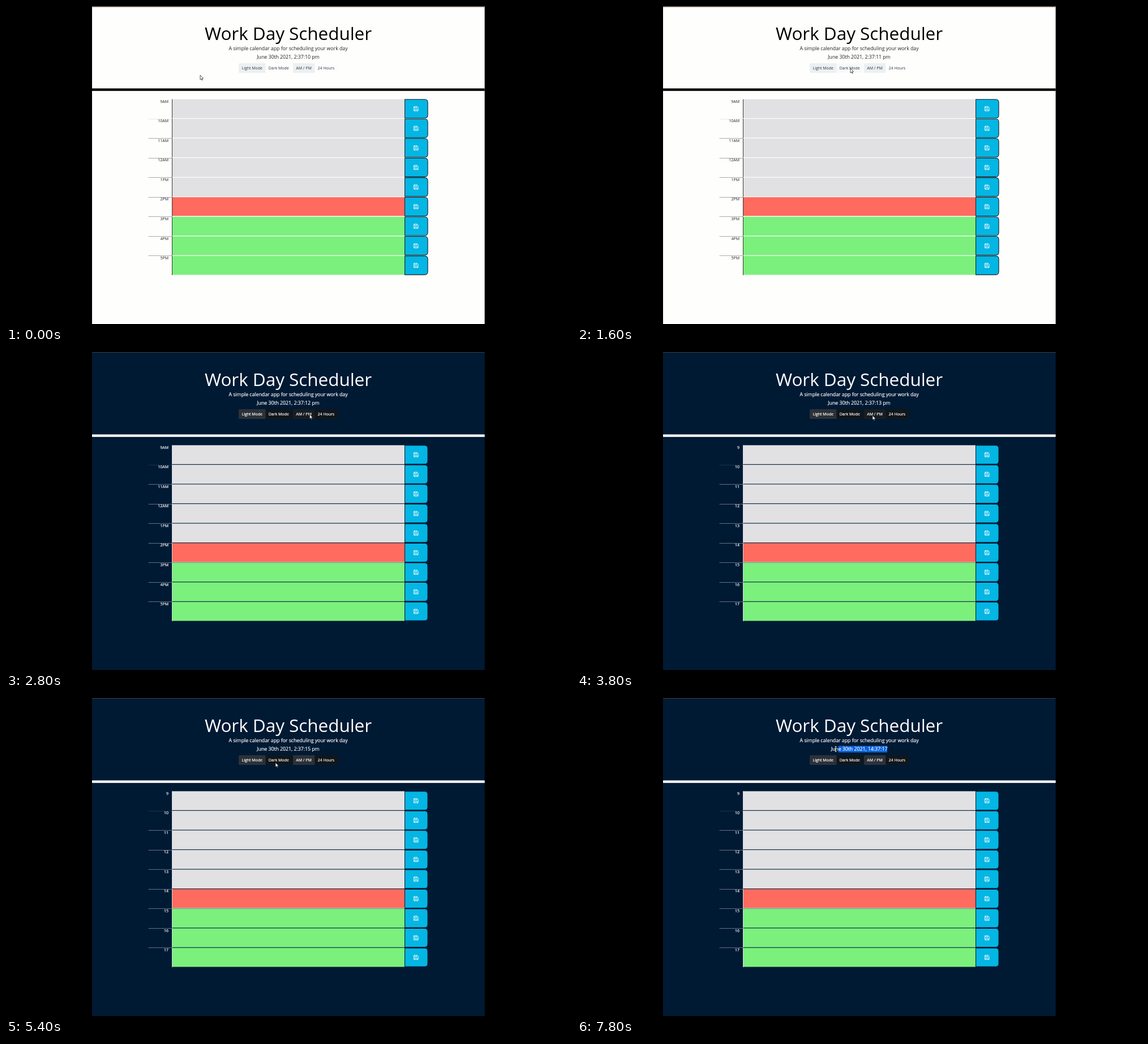
These frames come from a looping animation (998 px wide and 561 px high, 8 s). An HTML page:

```html
<!DOCTYPE html>
<html lang="en">
<head>
<meta charset="utf-8">
<title>Work Day Scheduler</title>
<style>
  html, body { margin: 0; width: 100%; height: 100%; overflow: hidden; background: #000; }
  svg {
    display: block; width: 998px; height: 561px;
    --page: #fefefd; --ink: #000; --text: #222; --gap: #fefefd; --top: #46392a;
    --edge: #14222c; --side: #222; --heavy: 0;
  }
  svg.dark {
    --page: #011a34; --ink: #fff; --text: #fff; --gap: #17304a; --top: #3b3a36;
    --edge: #011a34; --side: #dfe6ee; --heavy: .18px;
  }
  text { font-family: "Open Sans", sans-serif; fill: var(--text); text-anchor: middle; }
  .small { font-size: 6.98px; stroke: var(--text); stroke-width: var(--heavy); }
  .lead { font-size: 8.72px; stroke: var(--text); stroke-width: var(--heavy); }
  .hour { text-anchor: end; }
</style>
</head>
<body>
<svg id="stage" viewBox="0 0 998 561">
  <rect width="998" height="561"/>
  <rect x="152" width="693.5" height="561" fill="var(--page)"/>
  <rect id="strip" x="152" width="693.5" height="1.7" fill="var(--top)"/>
  <rect x="152" y="145.4" width="693.5" height="4.4" fill="var(--ink)"/>
  <text x="498.5" y="60.3" font-size="31.4" style="fill:var(--ink)">Work Day Scheduler</text>
  <text class="lead" x="498.5" y="77.6">A simple calendar app for scheduling your work day</text>
  <rect id="selection" y="84.5" height="11.5" fill="#0b63d8"/>
  <text id="date" class="lead" x="498.5" y="93.2"></text>
  <g id="buttons"></g>
  <g id="rows"></g>
  <path id="arrow" d="M0 0V8L1.9 6.3L3.1 9L4.3 8.4L3.1 5.9H5.6Z" fill="#fff" stroke="#111" stroke-width=".7"/>
  <path id="beam" d="M-1.5 -4.5H1.5M0 -4.5V4.5M-1.5 4.5H1.5" fill="none" stroke="#e8eef6" stroke-width=".9"/>
</svg>
<script>
const LOOP = 8000, STEP = 200, PITCH = 34.55;
const $ = id => document.getElementById(id);

function add(parent, tag, attrs, text = '') {
  const node = document.createElementNS('http://www.w3.org/2000/svg', tag);
  for (const key in attrs) node.setAttribute(key, attrs[key]);
  node.textContent = text;
  parent.append(node);
  return node;
}

// Tables of [time, value...]
const CURSOR = [
  [0, 343, 122], [400, 343, 122], [1200, 479, 112], [1600, 483, 110], [2400, 483, 110],
  [3000, 563, 110], [3400, 563, 111], [3800, 522, 112], [4200, 522, 112], [4800, 563, 111],
  [5000, 563, 111], [5400, 476, 114], [6000, 477, 113], [6200, 479, 109], [6600, 479, 109],
  [7200, 548, 90], [7400, 546, 90], [7600, 518, 90], [7800, 457, 90], [8000, 457, 90]
];
const CLOCK_24 = [[0, false], [3200, true], [4000, false], [5000, true]];
const DATE_24 = [[0, false], [6000, true]];
const DARK_AT = 1800, BEAM_AT = 7000, DRAG_AT = 7600;

const held = (table, t) => table.filter(row => row[0] <= t).pop()[1];

function along(table, t) {
  const i = Math.max(1, table.findIndex(row => row[0] > t));
  const [t0, x0, y0] = table[i - 1], [t1, x1, y1] = table[i];
  const k = (t - t0) / (t1 - t0);
  return [x0 + (x1 - x0) * k, y0 + (y1 - y0) * k];
}

const buttons = [
  ['Light Mode', 411, 458.7, 434.8], ['Dark Mode', 458.7, 505.2, 481.7],
  ['AM / PM', 507, 545.5, 526], ['24 Hours', 545.5, 586, 565.4]
].map(([name, left, right, middle]) => ({
  left, right,
  box: add($('buttons'), 'rect', { x: left, y: 101, width: right - left, height: 17, rx: 1.5 }),
  label: add($('buttons'), 'text', { class: 'small', x: middle, y: 112 }, name)
}));

const hours = Array.from({ length: 9 }, (_, i) => {
  const y = 164.5 + PITCH * i, rows = $('rows');
  const fill = i < 5 ? '#e1e1e3' : i === 5 ? '#ff6b5e' : '#7bf07d';
  if (i) add(rows, 'path', {
    d: `M252 ${Math.round(y - .5) + .5}H293`, stroke: 'var(--text)', 'stroke-width': .8,
    'stroke-dasharray': '1.3 .9', opacity: i === 1 ? .2 : .8
  });
  const label = add(rows, 'text', { class: 'small hour', x: 287, y: y + 6.2 });
  add(rows, 'rect', { x: 293, y: y - .5, width: 411, height: PITCH, fill: 'var(--gap)' });
  add(rows, 'rect', { x: 293.5, y, width: 410.5, height: PITCH - 1.2, fill });
  add(rows, 'rect', { x: 293, y, width: .9, height: PITCH - .6, fill: 'var(--side)' });
  add(rows, 'path', {
    d: `M704.5 ${y + .2}h35q5.5 0 5.5 5.5v22q0 5.5 -5.5 5.5h-35z`,
    fill: '#03b6e3', stroke: 'var(--edge)', 'stroke-width': 1.1
  });
  add(rows, 'path', {
    d: `M720.5 ${y + 13}h5.8l1.7 1.7v5.8h-7.5zM722 ${y + 13}v2.4h3.6v-2.4M722.2 ${y + 20.5}v-2.7h4v2.7`,
    fill: 'none', stroke: '#fff', 'stroke-width': .9
  });
  return label;
});
add($('rows'), 'rect', { x: 293.5, y: 370.4, width: 410.5, height: 1, fill: '#eef4ee' });

function hourName(i, full) {
  const hour = 9 + i;
  if (full) return hour;
  return hour > 12 ? hour - 12 + 'PM' : hour + 'AM';
}

function buttonFill(i, t, hover) {
  const first = i % 2 === 0;
  if (t < DARK_AT) return first ? '#ecf0f3' : hover ? '#f7f9fb' : '#fdfdfd';
  if (t < DARK_AT + STEP) return i === 3 ? '#fbfaff' : '#f3f4fa';
  if (first) return hover ? '#191d22' : '#2d3137';
  return '#11161a';
}

function render(t) {
  const dark = t >= DARK_AT, turned = t >= DARK_AT + STEP;
  $('stage').classList.toggle('dark', dark);
  $('strip').setAttribute('height', dark ? 1 : 1.7);

  const second = 10 + Math.floor(t / 1000);
  $('date').textContent = 'June 30th 2021, ' +
    (held(DATE_24, t) ? `14:37:${second}` : `2:37:${second} pm`);
  hours.forEach((label, i) => label.textContent = hourName(i, held(CLOCK_24, t)));

  const [x, y] = along(CURSOR, t);
  buttons.forEach(({ left, right, box, label }, i) => {
    const hover = x >= left && x < right && y > 101 && y < 118;
    box.setAttribute('fill', buttonFill(i, t, hover));
    label.style.fill = label.style.stroke = turned ? '#fff' : '#33383d';
  });

  const beam = t >= BEAM_AT, start = Math.min(548, x + 4.5);
  $('arrow').style.display = beam ? 'none' : '';
  $('beam').style.display = beam ? '' : 'none';
  $(beam ? 'beam' : 'arrow').setAttribute('transform', `translate(${x} ${y})`);
  $('selection').setAttribute('x', start);
  $('selection').setAttribute('width', t >= DRAG_AT ? 548 - start : 0);
}

const began = performance.now();
function tick() {
  const t = (performance.now() - began) % LOOP;
  render(Math.floor(t / STEP) * STEP);
  requestAnimationFrame(tick);
}
tick();
</script>
</body>
</html>
```
